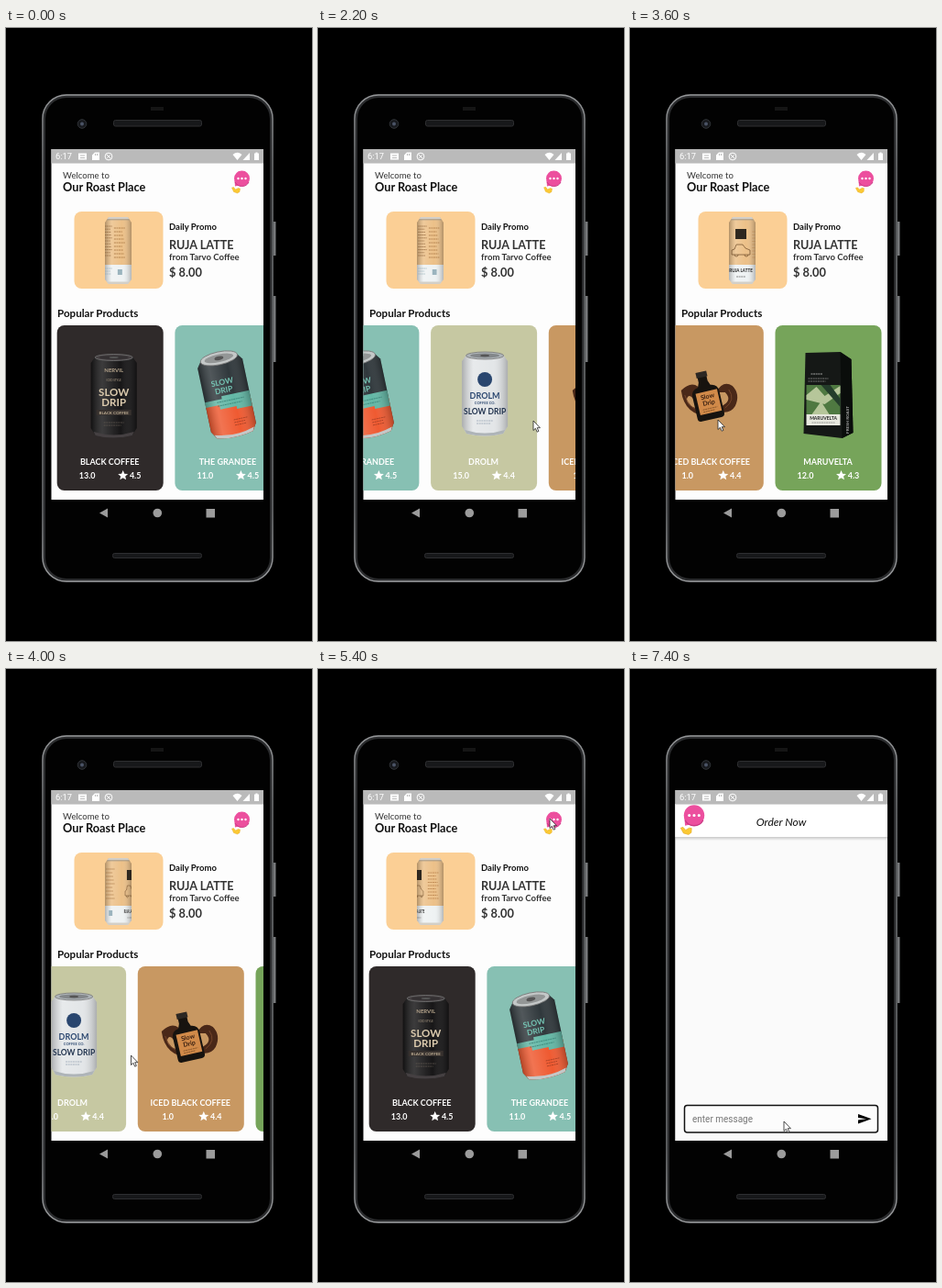
These frames come from a looping animation (334 px wide and 668 px high, 8 s). An HTML page:

```html
<!DOCTYPE html>
<html lang="en">
<head>
<meta charset="utf-8">
<title>Coffee app</title>
<style>
html, body { margin: 0; height: 100%; overflow: hidden; background: #000 }
svg { display: block; width: 334px; height: 668px; font-family: Lato, sans-serif }
.b { font-weight: 700 }
.c { text-anchor: middle }
.roboto { font-family: Roboto, sans-serif }
</style>
</head>
<body>
<svg viewBox="0 0 334 668">
  <defs>
    <clipPath id="screen"><rect x="49.5" y="132" width="231.5" height="382"/></clipPath>
    <clipPath id="canShape"><path d="M112 206H133L137 212V274L133 279H112L108 274V212Z"/></clipPath>
    <linearGradient id="round">
      <stop offset="0" stop-color="#000" stop-opacity=".25"/>
      <stop offset=".25" stop-color="#fff" stop-opacity=".16"/>
      <stop offset=".65" stop-color="#fff" stop-opacity="0"/>
      <stop offset="1" stop-color="#000" stop-opacity=".25"/>
    </linearGradient>
    <linearGradient id="edge" x2="0" y2="1">
      <stop offset="0" stop-color="#939597"/>
      <stop offset=".15" stop-color="#6b6d6f"/>
      <stop offset=".85" stop-color="#6b6d6f"/>
      <stop offset="1" stop-color="#9b9d9f"/>
    </linearGradient>
    <linearGradient id="barShade" x2="0" y2="1">
      <stop offset="0" stop-color="#000" stop-opacity=".2"/>
      <stop offset="1" stop-color="#000" stop-opacity="0"/>
    </linearGradient>
  </defs>

  <g id="phone">
    <path d="M293 211v37M293 292v72" stroke="#77797b" stroke-width="3"/>
    <rect x="41" y="74" width="249" height="528" rx="25" fill="#020202" stroke="#2b2c2e" stroke-width="4"/>
    <rect x="40" y="73" width="251" height="530" rx="26" fill="none" stroke="url(#edge)" stroke-width="1.4"/>
    <path d="M158 88h14" stroke="#151515" stroke-width="4"/>
    <rect x="117.5" y="100.5" width="96" height="6.5" rx="2" fill="#17181a" stroke="#2e2f31"/>
    <rect x="116.5" y="572.5" width="97" height="5" rx="2" fill="#17181a" stroke="#2e2f31"/>
    <circle cx="83" cy="104.5" r="4.8" fill="#17191d" stroke="#303337"/>
    <circle cx="83" cy="104.5" r="2" fill="#4a5365"/>
    <g fill="#9b9b9b"><path d="M102 528.5 111 523.5V533.5Z"/><circle cx="165.3" cy="528.5" r="4.8"/><rect x="218.5" y="524" width="9.5" height="9.5"/></g>
  </g>

  <g clip-path="url(#screen)">
    <g id="home">
      <path fill="#fdfdfd" d="M49 132h233v383H49z"/>
      <g fill="#333">
        <text x="62" y="163.5" font-size="9.6">Welcome to</text>
        <text x="62" y="178.3" font-size="12.75" class="b" fill="#111">Our Roast Place</text>
        <g class="b">
          <text x="178" y="220" font-size="9.5" fill="#111">Daily Promo</text>
          <text x="178" y="241.3" font-size="12.6">RUJA LATTE</text>
          <text x="178" y="253.3" font-size="9.6">from Tarvo Coffee</text>
          <text x="178" y="271.3" font-size="12.8">$ 8.00</text>
          <text x="56" y="315" font-size="11.6" fill="#111">Popular Products</text>
        </g>
      </g>
      <rect x="74.5" y="200" width="97" height="84" rx="8" fill="#fbcf95"/>
      <g clip-path="url(#canShape)">
        <path fill="#ecc088" d="M107 204h31v76h-31z"/>
        <path fill="#eef2f3" d="M107 258h31v22h-31z"/>
        <path fill="url(#round)" d="M108 204h29v76h-29z"/>
        <g id="label"></g>
        <path fill="#d3cfc7" d="M107 204h31v4.5h-31zM107 276.5h31v4h-31z"/>
        <path fill="#8d867b" d="M107 208.5h31v.8h-31z"/>
      </g>
      <g id="cards"></g>
    </g>

    <g id="order">
      <path fill="#fafafa" d="M49 147h233v368H49z"/>
      <path fill="#fff" d="M49 147h233v36H49z"/>
      <path fill="url(#barShade)" d="M49 183h233v4H49z"/>
      <text x="165" y="170.5" font-size="12" font-style="italic" class="c" fill="#111">Order Now</text>
      <rect x="59.5" y="475.5" width="211" height="29.5" rx="3" fill="#fcfcfc" stroke="#111" stroke-width="1.5"/>
      <text x="68" y="493.5" font-size="10" class="roboto" fill="#777">enter message</text>
      <path d="M249 485 263.5 490.2 249 495.5V491.5L258 490.2 249 489Z"/>
    </g>

    <g id="chat">
      <path fill="#ec4f9e" d="M-8 2-7.5 8.5-1 7Z"/>
      <circle r="8.5" fill="#ec4f9e"/>
      <path d="M-7.5 4A8.5 8.5 0 0 0 7.5 4" fill="none" stroke="#c93783"/>
      <path d="M-4 0h0M0 0h0M4 0h0" stroke="#fff" stroke-width="2.4" stroke-linecap="round"/>
      <path id="hand" fill="#fbc934" stroke="#e2a51f" stroke-width=".4" d="M-11 10-9 9.500-7 12-4 10.500-2 11-2.500 14.500-5 16-9 14.500Z"/>
    </g>

    <path fill="#bababa" d="M49 132h233v15.5H49z"/>
    <g fill="#fff">
      <text x="54" y="143.3" font-size="9.3" class="roboto">6:17</text>
      <path d="M79 136.5h9v7h-9zM97 135.5h5v8.5h-8v-5.5z"/>
      <path d="M81 139h5M81 141.5h5M97.5 137v2M99.5 137v2" stroke="#bababa"/>
      <circle cx="112" cy="140" r="3.9" fill="none" stroke="#fff"/>
      <path d="M109.5 137.5l5 5M110.5 141.5l3-3" stroke="#fff"/>
      <path d="M247.5 138Q252.5 133.5 257.5 138L252.5 144ZM258.5 144 266 136V144ZM271 136.5h1.5V135.5h2V136.5H276V144h-5z"/>
    </g>
  </g>
  <path id="cursor" fill="#fff" stroke="#222" stroke-width=".8" d="M0 0V10.5L2.4 8.3 4.2 12.2 5.9 11.4 4.2 7.7H7.4Z"/>
</svg>

<script>
const $ = id => document.getElementById(id);
const LOOP = 8000, STEP = 200, PITCH = 128.7;

const text = (x, y, size, str, fill = '#fff') =>
  `<text x="${x}" y="${y}" font-size="${size}" fill="${fill}" class="b c">${str}</text>`;
const path = (d, fill, extra = '') => `<path d="${d}" fill="${fill}" ${extra}/>`;
const rows = (x, y, w, n, gap, color) => {
  let d = '';
  for (let i = 0; i < n; i++) d += `M${x} ${y + i * gap}h${w - i * 7 % 4}`;
  return path(d, 'none', `stroke="${color}" stroke-width=".7" stroke-dasharray="2 .6"`);
};

// A drink can about its own centre, 50 wide and 92 high: painted areas, shading, then print
const canBody = 'M-20-42H20L25-35V36L20 44Q0 49-20 44L-25 36V-35Z';
const drinkCan = (fill, lid, lidDepth, paint, print) =>
  path(canBody, fill) + paint + path(canBody, 'url(#round)') + print +
  `<ellipse cy="-41" rx="20.5" ry="${lidDepth}" fill="${lid}" stroke="#777" stroke-width=".8"/>
   <ellipse cy="-41" rx="16" ry="${lidDepth * 0.6}" fill="#000" opacity=".25"/>
   <ellipse cy="-41" rx="5" ry="${lidDepth * 0.3}" fill="#555"/>` +
  path('M-22 40Q0 47 22 40L20 44Q0 49-20 44Z', lid);

const darkCan = `<g transform="translate(62 400)">${drinkCan('#171617', '#454042', 3.5, '',
  text(0, -25, 6, 'NERVIL', '#b8a78e') + text(0, -15, 3, 'ICED STYLE', '#8e8170') +
  text(0, 1, 11.5, 'SLOW', '#dccbae') + text(0, 11.5, 11.5, 'DRIP', '#dccbae') +
  path('M-19 16h38v6h-38z', '#37312e') + text(0, 21, 4.5, 'BLACK COFFEE', '#c4b398') +
  rows(-11, 30, 22, 2, 3, '#655d54'))}</g>`;

const tiltCan = `<g transform="translate(56.5 400) rotate(-12)">${drinkCan('#30383c', '#c4c8c8', 7,
  path('M-25 6H25V36L20 44Q0 49-20 44L-25 36Z', '#ef5a31') +
  path('M-25 3H-6V0H25V17H8V14H-10V9H-25Z', '#62b7a5'),
  text(-2, -12, 8.5, 'SLOW', '#76c7b6') + text(-2, -3, 8.5, 'DRIP', '#76c7b6') +
  rows(-12, 6, 30, 2, 4, '#337d72') + rows(2, 28, 15, 3, 3, '#9b3a22'))}</g>`;

const whiteCan = `<g transform="translate(59 398)">${drinkCan('#e3e6e8', '#aeb4b8', 4, '',
  '<circle cy="-15" r="8" fill="#29466f"/>' +
  text(0, 6, 9, 'DROLM', '#29466f') + text(0, 12, 4, 'COFFEE CO.', '#29466f') +
  text(0, 23, 8.5, 'SLOW DRIP', '#22344f') + rows(-9, 30, 18, 2, 3, '#8e9cac'))}</g>`;

const bottle = `<g transform="translate(54 403)">
  ${path('M-28-8Q-14-22-4-6L-14 2Q-20-6-22 2-20 12-4 12L8 20Q-24 22-28-8ZM10-6Q18-20 28-13 37-4 31 9 25 19 11 14L18 8Q28 2 20-6Z', '#4a2818')}
  ${path('M-24-3Q-20 12-5 15M24-9Q32 2 20 11', 'none', 'stroke="#75452a"')}
  <g transform="rotate(-13)">
    ${path('M-5-28H5V-18L7-13Q15-12 15-4V20Q15 24 11 24H-11Q-15 24-15 20V-4Q-15-12-7-13L-5-18Z', '#17130f')}
    ${path('M-6-29H6V-23H-6Z', '#2c2723')}
    ${path('M-11-7H13V17H-11Z', '#d18a49')}
    ${text(1, 1, 7, 'Slow', '#3a2012') + text(1, 8, 7, 'Drip', '#3a2012') + rows(-7, 12, 16, 2, 2.5, '#74451f')}
  </g></g>`;

const bag = path('M33 354 71 353 83 361 85 441 73 447 31 442Z', '#151816') +
  path('M71 353 83 361 85 441 73 447Z', '#0a0d0b') +
  rows(39, 377, 13, 1, 3, '#ddd') + rows(36, 382, 22, 2, 3, '#999') +
  path('M34 389H71V421H34Z', '#4f7941') +
  path('M34 400 45 391 54 401 71 390V398L54 410 34 405ZM40 421 50 407 59 421Z', '#b6c69a') +
  path('M50 389 60 389 71 404V413Z', '#243d2b') +
  path('M34 421H71V433H34Z', '#e8e9df') + text(52.5, 427, 5, 'MARUVELTA', '#222') +
  rows(40, 430, 25, 1, 3, '#777') +
  `<g transform="translate(80 427) rotate(-90)">${text(0, 0, 4.5, 'FRESH ROAST', '#aaa')}</g>`;

const star = 'M0-5.5 1.6-1.8 5.5-1.5 2.5 1 3.4 4.8 0 2.8-3.4 4.8-2.5 1-5.5-1.5-1.6-1.8Z';
const products = [
  ['BLACK COFFEE', '13.0', '4.5', '#2f2a2a', darkCan],
  ['THE GRANDEE', '11.0', '4.5', '#87c0b3', tiltCan],
  ['DROLM', '15.0', '4.4', '#c6c8a2', whiteCan],
  ['ICED BLACK COFFEE', '1.0', '4.4', '#c89862', bottle],
  ['MARUVELTA', '12.0', '4.3', '#76a45a', bag],
];
$('cards').innerHTML = products.map(([name, price, rating, color, art], i) =>
  `<g transform="translate(${55.7 + i * PITCH})">
    <rect y="324" width="116" height="180" rx="8" fill="${color}"/>${art}
    ${text(57.5, 475.5, 9, name) + text(33, 491, 9, price) + text(85.5, 491, 9, rating)}
    <g transform="translate(72 487.5)">${path(star, '#fff')}</g></g>`).join('');

// Label art placed around the promo can: [angle in degrees, markup]
const art = [
  [0, path('M-6 219h12v11h-12z', '#2e271f') +
    path('M-10 247H10V242L5 240 2 236H-5L-7 241-10 242ZM-7 247a2 2 0 0 0 4 0M4 247a2 2 0 0 0 4 0', 'none', 'stroke="#6d4a27" stroke-width=".7"') +
    text(0, 266, 4.6, 'RUJA LATTE', '#222') + rows(-5, 271, 10, 1, 2, '#555')],
  [75, rows(-6, 222, 12, 9, 3.5, '#af7740')],
  [150, path('M-7 221H7V250H-7Z', '#dfae76', 'stroke="#604024" stroke-width=".8"') + rows(-5, 225, 10, 9, 2.8, '#604024')],
  [205, rows(-6, 216, 12, 11, 3.2, '#81542b') + rows(-6, 262, 12, 3, 3, '#8ba5b1')],
  [260, rows(-6, 218, 12, 9, 4, '#9c6835') + path('M-2 263h5v6h-5z', '#9bb4be')],
];
$('label').innerHTML = art.map(([, markup]) => `<g>${markup}</g>`).join('');
const labelParts = [...$('label').children];

// Keyframes: [time, value, ...]
const scrollKeys = [[1200, 0], [1400, 25], [1700, 130], [2200, 190], [2600, 323], [2800, 390],
  [3000, 412], [3600, 412], [3800, 385], [4400, 124], [4800, 15], [5000, 0]];
const cursorKeys = [[800, 278, 390], [1200, 241, 425], [1800, 130, 427], [2200, 235, 428],
  [2600, 191, 428], [3000, 96, 428], [3600, 96, 427], [4400, 177, 415], [4800, 225, 350],
  [5400, 253, 163], [6200, 253, 163], [7200, 215, 438], [7400, 168, 493]];

function at(keys, t) {
  if (t <= keys[0][0]) return keys[0].slice(1);
  const i = keys.findIndex(k => k[0] >= t);
  if (i < 0) return keys.at(-1).slice(1);
  const a = keys[i - 1], b = keys[i], p = (t - a[0]) / (b[0] - a[0]);
  return a.slice(1).map((v, j) => v + (b[j + 1] - v) * p);
}
const move = (id, x, y, more = '') => $(id).setAttribute('transform', `translate(${x} ${y}) ${more}`);

function draw(t) {
  move('cards', -at(scrollKeys, t)[0], 0);

  const spin = (t - 3600) * 0.169 - 6;
  labelParts.forEach((part, i) => {
    const a = (art[i][0] + spin) * Math.PI / 180, c = Math.cos(a);
    part.setAttribute('visibility', c > 0.05 ? 'visible' : 'hidden');
    part.setAttribute('transform', `translate(${122.5 + 14 * Math.sin(a)}) scale(${c} 1)`);
  });

  // The chat button flies across while the order page fades up
  const p = Math.min(1, Math.max(0, (t - 6100) / 300)), e = 1 - (1 - p) ** 3;
  $('order').setAttribute('opacity', e);
  move('order', 0, 40 * (1 - e));
  move('chat', 257.5 - 187.5 * e, 164 - 4.5 * e, `scale(${1 + 0.32 * e})`);
  $('hand').setAttribute('transform', `rotate(${5 * Math.sin(t / 320)} -6 12)`);

  const [x, y] = at(cursorKeys, t);
  move('cursor', x, y);
  $('cursor').setAttribute('visibility', t < 800 ? 'hidden' : 'visible');
}

function tick(now) {
  const t = Math.floor(now % LOOP / STEP) * STEP;
  draw(Math.min(t, 7400));
  requestAnimationFrame(tick);
}
draw(0);
requestAnimationFrame(tick);
</script>
</body>
</html>
```
